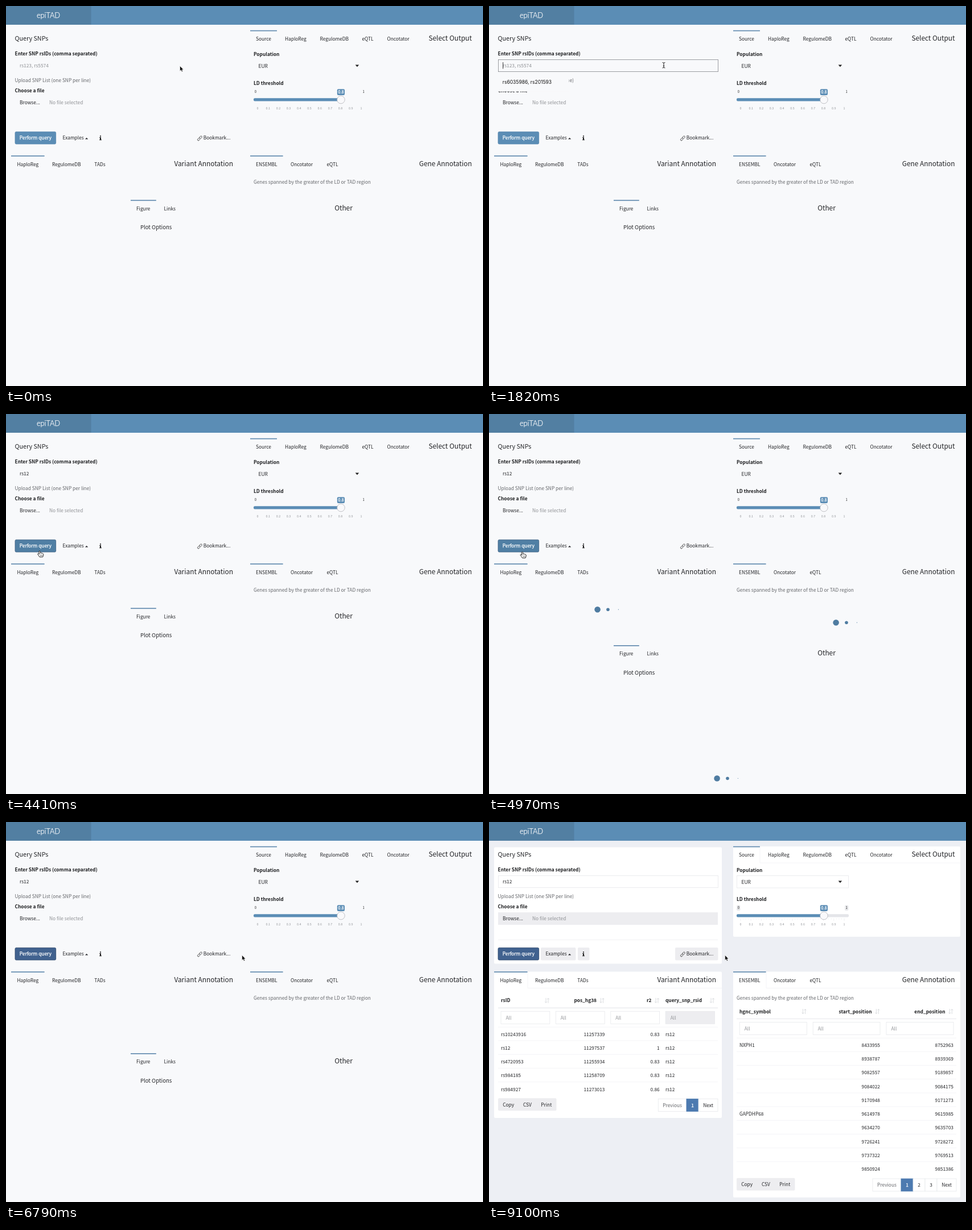
Write an HTML page that moves like this. It is 838 px wide and 669 px high and loops after 9170 ms.

```html
<!DOCTYPE html>
<html lang="en">
<head>
<meta charset="utf-8">
<title>epiTAD query</title>
<style>
html, body { margin: 0; width: 100%; height: 100%; overflow: hidden; background: #f8f9fb; }
svg { display: block; width: 838px; height: 669px; }
text { font: 8.35px "Noto Sans CJK JP", "Noto Sans CJK SC", "Noto Sans CJK", "Noto Sans", sans-serif; fill: #232427; white-space: pre; }
.bold { font-weight: 700; fill: #1d1e20; }
.soft { fill: #65676b; }
.pale { fill: #8f9195; }
.white { fill: #fff; stroke: #fff; stroke-width: 0.25px; }
.h { font-size: 10.75px; }
.tabTitle { font-size: 11.87px; }
.sub { font-size: 9.55px; }
.brand { font: 300 12.8px Lato, sans-serif; fill: #fff; stroke: #fff; stroke-width: 0.25px; }
.tiny { font-size: 5.4px; fill: #919397; }
.mini { font-size: 5.8px; fill: #222; }
.badge { font-size: 7.1px; fill: #fff; stroke: #fff; stroke-width: 0.25px; }
.hint { font: 8.5px Inter, "Liberation Sans", sans-serif; fill: #111; }
</style>
</head>
<body>
<svg id="stage" viewBox="0 0 838 669"></svg>
<script>
const LOOP = 9170, STEP = 70;
const PAPER = '#f8f9fb', BLUE = '#5b8db5', LINE = '#e7e8ec', FAINT = '#f1f2f5', GREY = '#ededf0';
const T = { focus: 1400, hintOn: 1540, hintOff: 2520, blur: 4410, load: 4795, loadEnd: 6300, done: 7000 };
const KEYS = [2240, 2380, 2520, 2660];
const stage = document.getElementById('stage');

function el(parent, tag, attrs) {
  const node = document.createElementNS('http://www.w3.org/2000/svg', tag);
  for (const k in attrs) node.setAttribute(k, attrs[k]);
  parent.append(node);
  return node;
}
const group = parent => el(parent, 'g', {});
const rect = (g, x, y, x2, y2, fill, stroke = 'none', rx = 0) =>
  el(g, 'rect', { x, y, width: x2 - x, height: y2 - y, fill, stroke, rx, 'stroke-width': 0.8 });
const path = (g, d, fill, stroke = 'none', width = 1) =>
  el(g, 'path', { d, fill, stroke, 'stroke-width': width });
const hline = (g, x, x2, y, color = FAINT, width = 0.8) =>
  path(g, `M${x} ${y}H${x2}`, 'none', color, width);
function text(g, x, y, value, cls = '', anchor = 'start') {
  const node = el(g, 'text', { x, y, class: cls, 'text-anchor': anchor });
  node.textContent = value;
  return node;
}
const show = (node, on) => node.setAttribute('display', on ? 'inline' : 'none');

function tabs(g, y, x, x2, names) {
  rect(g, x, y + 0.2, x2, y + 1.9, '#638cb0');
  names.forEach(([at, name]) => text(g, at, y + 18.6, name));
}

// Backdrop of the finished page
rect(stage, 0, 0, 838, 669, PAPER);
const panels = group(stage);
rect(panels, 0, 0, 838, 669, '#edeff4');
[[9, 44.5, 409, 249.5], [429, 43, 828, 202], [9, 263.5, 409, 521], [429, 263.5, 828, 661]]
  .forEach(b => rect(panels, ...b, '#fff', 'none', 2));
rect(panels, 16.4, 94.4, 402.5, 115.6, '#fff', LINE);
rect(panels, 16, 159, 402, 181, GREY);
hline(panels, 16, 402, 207.5, '#eeeff2');
[[91, 152.5], [156, 176.5], [327, 402.5]]
  .forEach(([x, x2]) => rect(panels, x, 221, x2, 243.5, GREY, 'none', 2));
rect(panels, 435.4, 94.4, 631.6, 116, '#fff', LINE);
rect(panels, 435, 146.5, 441.5, 156, '#e8e9ec', 'none', 2);
rect(panels, 625, 146.5, 631.5, 156, '#e8e9ec', 'none', 2);
rect(panels, 588, 162.2, 632, 167.6, '#e4e5e9', 'none', 2);
for (let i = 0; i <= 40; i++)
  path(panels, `M${442 + i * 4.55} 169.5v${i % 4 ? 2 : 4.5}`, 'none', '#e3e4e8', 0.6);
[[476, 828, 72, 476], [68, 409, 292.5, 68], [487, 828, 292.5, 487]].forEach(([x, x2, y, edge]) => {
  hline(panels, x, x2, y);
  path(panels, `M${edge} ${y}v-27`, 'none', FAINT, 0.8);
});

// Header and query form
const page = group(stage);
rect(page, 0, 0, 838, 33, BLUE);
rect(page, 0, 0, 149.5, 33, '#527fa2');
text(page, 74.5, 21, 'epiTAD', 'brand', 'middle');
text(page, 15.5, 61, 'Query SNPs', 'h');
text(page, 15.5, 87.4, 'Enter SNP rsIDs (comma separated)', 'bold');
text(page, 15.5, 133.8, 'Upload SNP List (one SNP per line)', 'soft');
text(page, 15.5, 152.2, 'Choose a file', 'bold');
text(page, 24, 173.2, 'Browse...');
text(page, 76, 173.2, 'No file selected', 'pale');
const button = rect(page, 16, 221.4, 87.6, 243, BLUE, BLUE, 2);
text(page, 51.8, 235.4, 'Perform query', 'white', 'middle');
text(page, 99.5, 235.4, 'Examples');
path(page, 'M139 234.5l2.6-2.7 2.6 2.7z', '#2a2b2e');
path(page, 'M165 228.2h2v1.7h-2zM164.2 231h2.8v4h.8v1.2h-3.6v-1.2h.8v-2.8h-.8z', '#222');
path(page, 'M339.6 231.4l2-2a1.5 1.5 0 0 1 2.2 2.1l-2 2a1.5 1.5 0 0 1-2.2 0M341 232.4a1.5 1.5 0 0 0-2.2 0l-1.9 2a1.5 1.5 0 0 0 2.2 2.1l1.4-1.5', 'none', '#333', 0.9);
text(page, 346.7, 235.4, 'Bookmark...');

// Output selection
tabs(page, 42.5, 429, 476, [[439, 'Source'], [490, 'HaploReg'], [551.5, 'RegulomeDB'], [625.5, 'eQTL'], [669.5, 'Oncotator']]);
text(page, 818.5, 61, 'Select Output', 'tabTitle', 'end');
text(page, 435, 88, 'Population', 'bold');
text(page, 443.5, 108.7, 'EUR');
path(page, 'M613.6 103.6h6.6l-3.3 3.6z', '#222');
text(page, 435, 139.4, 'LD threshold', 'bold');
text(page, 438.3, 153.4, '0', 'mini', 'middle');
text(page, 628.2, 153.4, '1', 'mini', 'middle');
rect(page, 435, 162.2, 588, 167.6, BLUE, 'none', 2);
rect(page, 581.8, 146.3, 595, 157, BLUE, 'none', 2);
text(page, 588.4, 154.3, '0.8', 'badge', 'middle');
el(page, 'circle', { cx: 588.4, cy: 165, r: 6.8, fill: '#f9f9fb', stroke: '#a9abb0', 'stroke-width': 0.7 });
for (let i = 0; i <= 10; i++) text(page, 442 + i * 18.2, 181.8, String(i / 10), 'tiny', 'middle');

// Annotation tabs
tabs(page, 263, 9, 67.6, [[19.5, 'HaploReg'], [81, 'RegulomeDB'], [155.3, 'TADs']]);
text(page, 399, 281.5, 'Variant Annotation', 'tabTitle', 'end');
tabs(page, 263, 429, 486.6, [[439, 'ENSEMBL'], [500, 'Oncotator'], [563.5, 'eQTL']]);
text(page, 818.5, 281.5, 'Gene Annotation', 'tabTitle', 'end');
text(page, 435, 312.8, 'Genes spanned by the greater of the LD or TAD region', 'soft');

const other = group(stage);
tabs(other, 341.2, 219, 263.8, [[229, 'Figure'], [277.5, 'Links']]);
text(other, 608.8, 359.6, 'Other', 'tabTitle', 'end');
text(other, 236, 393, 'Plot Options', 'sub');

// Result tables
const results = group(stage);
function sortIcon(x, y) {
  path(results, `M${x - 2} ${y - 4.5}v8.5m-2-2l2 2 2-2M${x + 2} ${y + 4.5}v-8.5m-2 2l2-2 2 2`, 'none', '#d6d8dc', 0.9);
}
function buttons(x, y, names) {
  rect(results, x, y, x + 102.5, y + 22, GREY, 'none', 2);
  names.forEach((name, i) => text(results, x + [8.2, 44, 75.3][i], y + 14.3, name));
}
function pager(y, edges, labels) {
  labels.forEach((label, i) => {
    const on = label === '1', x = edges[i], x2 = edges[i + 1];
    rect(results, x, y, x2, y + 22, on ? '#4d7ab0' : '#fff', on ? '#4d7ab0' : LINE);
    text(results, (x + x2) / 2, y + 14.1, label, on ? 'white' : label === 'Previous' ? 'soft' : '', 'middle');
  });
}
function table({ x, x2, top, cols, rows }) {
  cols.forEach(({ name, end, at, icon, box, off }) => {
    text(results, at, top, name, 'bold', end ? 'end' : 'start');
    sortIcon(icon, top - 3);
    rect(results, box[0], top + 16, box[1], top + 38, off ? GREY : '#fff', LINE);
    text(results, box[0] + 8.5, top + 30.2, 'All', 'pale');
  });
  hline(results, x, x2, top + 10, LINE, 1.2);
  hline(results, x, x2, top + 43.8);
  rows.forEach((row, r) => {
    const y = top + 59.4 + r * 24.23;
    row.split(' ').forEach((cell, c) =>
      text(results, cols[c].cell, y, cell, '', cols[c].end ? 'end' : 'start'));
    if (r) hline(results, x, x2, y - 16);
  });
}
table({
  x: 16, x2: 402, top: 317.3,
  cols: [
    { name: 'rsID', at: 21, cell: 21, icon: 102, box: [21, 106.8] },
    { name: 'pos_hg38', at: 189, cell: 203.5, icon: 198.5, box: [117.3, 203.2], end: 1 },
    { name: 'r2', at: 285.5, cell: 299.7, icon: 295, box: [213.8, 299.6], end: 1 },
    { name: 'query_snp_rsid', at: 310, cell: 310, icon: 392, box: [310.2, 396.4], off: 1 }
  ],
  rows: ['rs10243916 11257339 0.83 rs12', 'rs12 11297537 1 rs12', 'rs4720953 11255934 0.83 rs12',
    'rs984185 11258709 0.83 rs12', 'rs984927 11273013 0.86 rs12']
});
table({
  x: 435, x2: 821, top: 336.5,
  cols: [
    { name: 'hgnc_symbol', at: 440, cell: 440, icon: 553.5, box: [440.3, 558.3] },
    { name: 'start_position', at: 672.5, cell: 687, icon: 682.3, box: [569.2, 687], end: 1 },
    { name: 'end_position', at: 801.5, cell: 816, icon: 811.3, box: [698, 816], end: 1 }
  ],
  rows: ['NXPH1 8433955 8752963', ' 8938787 8939369', ' 9082557 9189857', ' 9084022 9084175', ' 9170948 9171273',
    'GAPDHP68 9614978 9615985', ' 9634270 9635703', ' 9726241 9728272', ' 9737322 9769513', ' 9850924 9851386']
});
buttons(16, 486.3, ['Copy', 'CSV', 'Print']);
buttons(435, 626.8, ['Copy', 'CSV', 'Print']);
pager(487.5, [297.3, 347, 368, 402], ['Previous', '1', 'Next']);
pager(628, [674, 724, 745, 766, 787, 821], ['Previous', '1', '2', '3', 'Next']);

// Query input
const input = group(stage);
const focusBox = rect(input, 16.4, 94.4, 402.5, 115.6, PAPER, '#85878c');
const hint = group(input);
rect(hint, 15, 118, 140.5, 150.6, PAPER);
text(hint, 23.8, 137, 'rs6035986, rs201593', 'hint');
const placeholder = text(input, 24, 108.4, 'rs123, rs5574', 'pale');
const typed = text(input, 24, 108.4, '');
const caret = rect(input, 0, 99, 0.9, 110.5, '#222');

// Loading dots
const spinner = group(stage);
const dots = [];
for (const [x, y] of [[209, 344.2], [628, 367.2], [419, 641.5]])
  [-1, 0, 1].forEach(side => dots.push({
    lead: (1 - side) * 160,
    node: el(spinner, 'circle', { cx: x + side * 18.4, cy: y, fill: '#4f7ca1' })
  }));

// Pointers, each drawn with its hot spot at 0,0
const pointer = group(stage);
const shapes = { arrow: group(pointer), beam: group(pointer), hand: group(pointer) };
path(shapes.arrow, 'M0 0V9L2 7.2 3.4 10.3 5 9.6 3.7 6.6H6.3Z', '#111', '#fff', 0.6);
path(shapes.beam, 'M-2.4 -4.5Q0 -4.5 0 -3.3Q0 -4.5 2.4 -4.5M0 -3.5V4M-2.4 5Q0 5 0 3.8Q0 5 2.4 5M-1.2 1.4H1.2', 'none', '#222', 1);
path(shapes.hand, 'M-1.2 0.4Q0 -1.1 1 0.4L1.4 3.6 2.8 3.4 4.2 3.8 5.6 4.2 6.7 5.2V7.4L5.6 10.4H0L-2 7.4 -3.5 5.2Q-3.1 3.8 -1.6 4.8L-0.6 5.6Z', '#fff', '#222', 1);
path(shapes.hand, 'M1.4 6.4V8.6M3 6.4V8.6M4.6 6.4V8.6', 'none', '#222', 0.6);

const TRACK = [[0, 305.5, 105.5], [1050, 305.5, 105.5], [1400, 307, 104], [2800, 307, 104], [2940, 304, 104.5],
  [3640, 304, 104.5], [3920, 190, 165], [4270, 60, 238], [4480, 58.5, 243], [5880, 58.5, 243],
  [6090, 180, 240], [6300, 354, 233], [6440, 414.6, 234.4], [LOOP, 414.6, 234.4]];

function mouseAt(t) {
  const i = TRACK.findIndex(k => k[0] > t);
  const [t0, x0, y0] = TRACK[i - 1], [t1, x1, y1] = TRACK[i];
  const k = (t - t0) / (t1 - t0);
  return [x0 + (x1 - x0) * k, y0 + (y1 - y0) * k];
}
// Inverts cubic-bezier(.42, 0, .58, 1)
function easeInOut(x) {
  let a = 0, b = 1;
  for (let i = 0; i < 20; i++) {
    const s = (a + b) / 2;
    if (1.26 * s * (1 - s) ** 2 + 1.74 * s * s * (1 - s) + s ** 3 < x) a = s; else b = s;
  }
  return a * a * (3 - 2 * a);
}
function dotRadius(t) {
  const p = (t % 1800) / 720;
  const k = p < 1 ? easeInOut(p) : p < 2 ? 1 - easeInOut(p - 1) : 0;
  return Math.max(0, 6.7 - 6.95 * (1 - k));
}

function render(t) {
  const done = t >= T.done, loading = t >= T.load && t < T.loadEnd;
  const focused = t >= T.focus && t < T.blur;
  show(panels, done);
  show(results, done);
  show(other, !done);
  other.setAttribute('transform', `translate(0 ${t >= T.load ? 65.6 : 0})`);

  const count = KEYS.filter(k => t >= k).length;
  typed.textContent = 'rs12'.slice(0, count);
  show(placeholder, !count);
  show(focusBox, focused);
  show(hint, t >= T.hintOn && t < T.hintOff);
  const since = t - (count ? KEYS[count - 1] : T.focus);
  show(caret, focused && since % 1000 < 500);
  caret.setAttribute('x', 24.2 + [0, 3.3, 7.2, 11.8, 16.5][count]);

  show(spinner, loading);
  if (loading) dots.forEach(d => d.node.setAttribute('r', dotRadius(t - T.load + d.lead)));

  const [x, y] = mouseAt(t);
  const overButton = x > 16 && x < 88 && y > 221 && y < 244;
  const overLink = x > 327 && x < 402 && y > 221 && y < 244;
  const overInput = t >= 1120 && x > 16 && x < 403 && y > 94 && y < 116;
  const kind = overButton || overLink ? 'hand' : overInput ? 'beam' : 'arrow';
  for (const name in shapes) show(shapes[name], name === kind);
  pointer.setAttribute('transform', `translate(${x} ${y})`);

  const pressed = t >= T.blur && !overButton;
  button.setAttribute('fill', pressed ? '#41628f' : overButton ? '#507fa4' : BLUE);
  button.setAttribute('stroke', pressed ? '#2a4468' : overButton ? '#3d5f80' : '#5586ae');
}

function frame() {
  render(Math.floor(performance.now() % LOOP / STEP) * STEP);
  requestAnimationFrame(frame);
}
frame();
</script>
</body>
</html>
```
